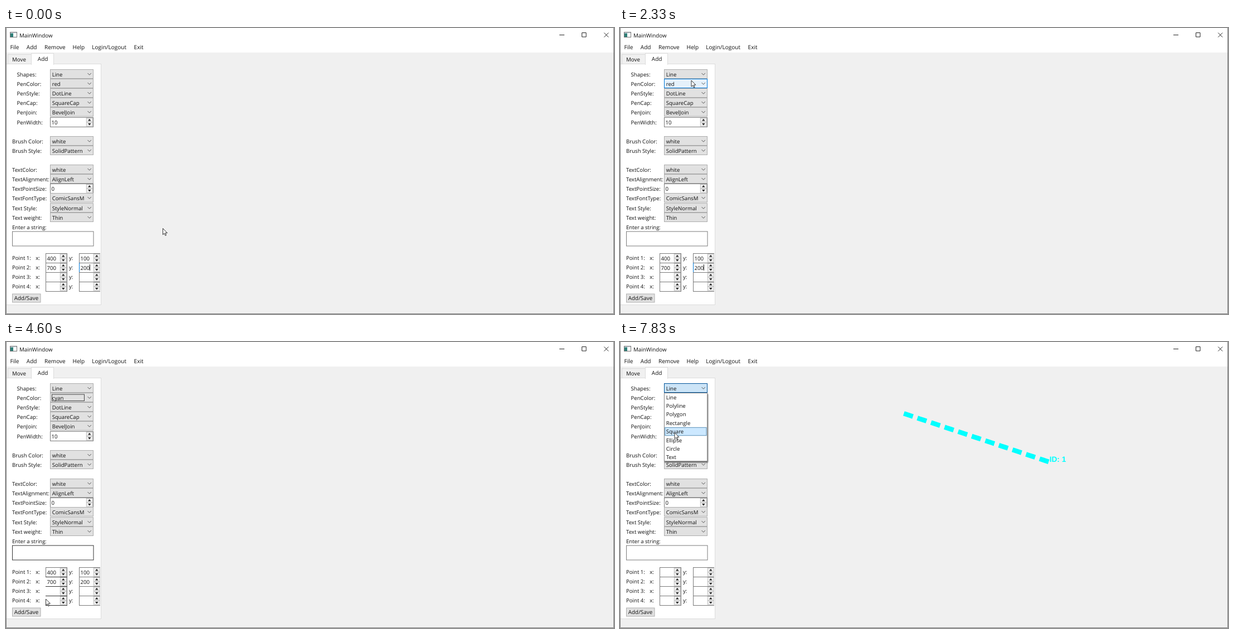
Animation, 1091 px wide and 513 px high, one loop 8000 ms. Source, as an HTML page:

```html
<!DOCTYPE html>
<html lang="en">
<head>
<meta charset="utf-8">
<title>MainWindow</title>
<style>
  html, body { margin: 0; width: 100%; height: 100%; overflow: hidden; background: #f0f0f0; }
  svg { display: block; }
  text { font: 9.65px "Open Sans", "Noto Sans", sans-serif; fill: #111; text-rendering: geometricPrecision; white-space: pre; }
  .popup { filter: drop-shadow(1.5px 2px .8px #0009); }
  .id { font: bold 16px "Liberation Sans", Arial, sans-serif; fill: #0ff; }
</style>
</head>
<body>
<svg id="stage" width="1091" height="513" viewBox="0 0 1091 513">
  <g id="chrome"></g><g id="form"></g><g id="drawing"></g><g id="overlay"></g>
  <path id="cursor" d="M0 0V11.2L2.6 8.8 4.4 12.8 6.1 12.1 4.4 8.1H7.9Z" fill="#fff" stroke="#111" stroke-width=".85"/>
</svg>
<script>
const LOOP = 8000, UNIT = 0.856, ROW = 20 * UNIT, ITEM = 18 * UNIT;
const GREY = '#adadad', EDGE = '#7a7a7a', BLUE = '#0078d7';
const $ = id => document.getElementById(id);

const text = (x, y, s, size = 9.65) => `<text x="${x}" y="${y}" style="font-size:${size}px">${s}</text>`;
const fill = (x, y, w, h, color) => `<rect x="${x}" y="${y}" width="${w}" height="${h}" fill="${color}"/>`;
const box = (x, y, w, h, color, edge, alpha = 1) =>
  `<rect x="${x + .5}" y="${y + .5}" width="${w - 1}" height="${h - 1}" fill="${color}" stroke="${edge}" opacity="${alpha}"/>`;
const stroke = (d, color, width = 1) => `<path d="${d}" fill="none" stroke="${color}" stroke-width="${width}"/>`;
const rowY = k => Math.floor(74.4 + ROW * k);

// row, label, value, kind
const FIELDS = [
  [0, 'Shapes:', 'Line'], [1, 'PenColor:', 'red'], [2, 'PenStyle:', 'DotLine'],
  [3, 'PenCap:', 'SquareCap'], [4, 'PenJoin:', 'BevelJoin'], [5, 'PenWidth:', '10', 'spin'],
  [7, 'Brush Color:', 'white'], [8, 'Brush Style:', 'SolidPattern'],
  [10, 'TextColor:', 'white'], [11, 'TextAlignment:', 'AlignLeft'], [12, 'TextPointSize:', '0', 'spin'],
  [13, 'TextFontType:', 'ComicSansM'], [14, 'Text Style:', 'StyleNormal'], [15, 'Text weight:', 'Thin'],
];
const MENUS = {
  0: ['Line', 'Polyline', 'Polygon', 'Rectangle', 'Square', 'Ellipse', 'Circle', 'Text'],
  1: ['white', 'black', 'red', 'green', 'blue', 'cyan', 'magenta', 'yellow', 'gray'],
};
const POINTS = [['400', '100'], ['700', '200'], ['', ''], ['', '']];

// time, cursor x, cursor y, changes that persist
const STEPS = [
  [0, 281.5, 359.5, { pen: 'red', filled: true, typing: true, caret: true, menu: -1, pick: -1, focus: -1, alpha: 1 }],
  [260, 281.5, 359.5, { caret: false }],
  [810, 281.5, 359.5, { caret: true }],
  [930, 235, 262],
  [1050, 156.5, 123],
  [1210, 148, 100],
  [1350, 141, 84, { caret: false }],
  [1470, 137, 80],
  [1590, 134.5, 79],
  [1850, 134, 82, { caret: true }],
  [2090, 131, 88],
  [2210, 128, 94],
  [2450, 127, 94, { caret: false, typing: false }],
  [2570, 127, 94, { menu: 1, pick: 2 }],
  [2710, 126, 137],
  [2830, 125, 162, { pick: 3 }],
  [3390, 124.5, 171],
  [3540, 124, 178, { pick: 4 }],
  [3670, 123, 187],
  [3820, 122, 194, { pick: 5 }],
  [4090, 122, 197, { menu: -1, pen: 'cyan', focus: 1 }],
  [4220, 115, 329],
  [4360, 98, 384, { dark: true }],
  [4480, 82, 436],
  [4600, 71.5, 461, { lit: true }],
  [4750, 54, 476, { dark: false, lit: false }],
  [4880, 45, 482],
  [5030, 45, 482, { drawn: true, filled: false, focus: -1, button: true }],
  [5180, 58, 477],
  [5300, 150, 430],
  [5425, 290, 350],
  [5550, 420, 285],
  [5670, 497, 249],
  [6080, 460, 243.5],
  [6230, 440, 232],
  [6355, 325, 168],
  [6480, 190, 102],
  [6600, 119, 80],
  [6740, 119, 80, { button: false, focus: 0, alpha: .5 }],
  [6870, 119, 80, { menu: 0, pick: 0 }],
  [7030, 119, 80, { alpha: .3 }],
  [7180, 119, 80, { alpha: .12 }],
  [7330, 108, 145, { pick: 3, focus: -1 }],
  [7460, 99, 170, { pick: 5 }],
  [7710, 98.5, 167],
  [7830, 98, 162.5, { pick: 4 }],
];
let state = {};
const STATES = STEPS.map(([time, x, y, change]) => (state = { ...state, time, x, y, ...change }));

const arrows = (x, y) => [0, 1].map(down => {
  const cy = y + (down ? 12.7 : 4.8), tip = down ? 1.7 : -1.7;
  return box(x - 6, y + 1 + down * 7.5, 12, 8, '#f0f0f0', '#c0c0c0')
    + `<path d="M${x - 2.8} ${cy - tip}h5.6L${x} ${cy + tip}z" fill="#222"/>`;
}).join('');

const spin = (x, y, w, value, edge = EDGE) =>
  box(x, y, w, 18, '#fff', edge) + arrows(x + w - 7.2, y) + text(x + 2.5, y + 12.8, value);

function combo(k, value, s) {
  const y = rowY(k), open = s.menu === k;
  const hover = s.menu < 0 && s.x >= 79 && s.x < 156 && s.y >= y && s.y < y + 17;
  const [color, edge] = open ? ['#cce4f7', '#005499'] : hover ? ['#e5f1fb', BLUE] : ['#e1e1e1', GREY];
  return box(79, y, 78, 17, color, edge)
    + (s.focus === k ? box(82, y + 2.5, 59, 12.5, 'none', '#444', s.alpha) : '')
    + text(82.7, y + 12.6, value)
    + stroke(`M146.5 ${y + 7}l3.2 3.2 3.2-3.2`, '#444', .9);
}

function pointRow(i, s) {
  const y = Math.floor(404 + ROW * i);
  const [px, py] = s.filled ? POINTS[i] : ['', ''];
  let out = text(11, y + 12.4, `Point ${i + 1}:`) + text(53.3, y + 12.4, 'x:') + text(113, y + 12.4, 'y:')
    + spin(71, y, 39, px) + spin(131, y, 39, py);
  if (s.lit && i) out += fill(71, y + 1, 1, 16, '#fff') + stroke(`M71 ${y + .5}h39M71 ${y + 17.5}h39`, '#333');
  if (i === 1 && s.typing) out += stroke(`M131.5 ${y}v17`, BLUE);
  if (i === 1 && s.caret) out += stroke(`M150.4 ${y + 3}v11`, '#111');
  return out;
}

function button(s) {
  const hover = s.x >= 12 && s.x < 62 && s.y >= 477 && s.y < 493;
  const [color, edge] = hover ? ['#e5f1fb', BLUE] : ['#e1e1e1', s.button ? '#777' : GREY];
  return box(11, 476.5, 51.5, 16, color, edge)
    + (s.button ? box(13, 478.5, 47.5, 12, 'none', '#666') : '')
    + text(14.8, 488.3, 'Add/Save', 9.9);
}

function form(s) {
  const fields = FIELDS.map(([k, label, value, kind]) => {
    const y = rowY(k);
    return text(k < 6 ? 19.5 : 11, y + 13.4, label)
      + (kind ? spin(79, y, 78, value) : combo(k, k === 1 ? s.pen : value, s));
  });
  return fields.join('') + text(11, 361, 'Enter a string:', 9.55) + fill(72, 352, 6, 11, '#fff')
    + box(11, 364.5, 146.5, 27, '#fff', s.dark ? '#333' : EDGE)
    + POINTS.map((_, i) => pointRow(i, s)).join('')
    + fill(169, 402, 1, 72, '#fff') + button(s);
}

function popup(s) {
  const items = MENUS[s.menu];
  if (!items) return '';
  const top = rowY(s.menu) + 17;
  const rows = items.map((name, i) => {
    const y = top + .2 + i * ITEM;
    return (i === s.pick ? box(80.3, y, 75.2, 15.4, '#cce8ff', '#5a91b8') : '') + text(82.7, y + 11.3, name);
  });
  return `<g class="popup">${box(79, top, 78, items.length * ITEM, '#fff', '#8a8a8a')}</g>` + rows.join('');
}

const drawing = `<g transform="translate(171 44) scale(${UNIT})">
  <path d="M400 100L700 200" stroke="#0ff" stroke-width="10" stroke-linecap="square" stroke-dasharray="10 20"/>
  <text class="id" x="700.5" y="199.5">ID: 1</text></g>`;

$('chrome').innerHTML = fill(0, 0, 1091, 513, '#f0f0f0') + fill(0, 0, 1091, 44, '#fff')
  + box(7, 7, 13, 10, '#fff', '#777') + fill(8, 8, 11, 1.5, '#ccd3dc') + fill(8, 9.5, 5, 6.5, '#2f7f78')
  + text(24, 16.6, 'MainWindow', 9.8)
  + stroke('M993 12.5h9M1033.5 8.5h7.5v7.5h-7.5zM1073.2 8.5l8 8m0-8l-8 8', '#222')
  + [['File', 7.5], ['Add', 36.8], ['Remove', 69], ['Help', 119.5], ['Login/Logout', 154.3], ['Exit', 229.6]]
    .map(([name, x]) => text(x, 38.2, name, 10.05)).join('')
  + box(3, 47, 43, 19, '#f0f0f0', '#dcdcdc') + box(0, 64, 171, 433, '#fff', '#dcdcdc')
  + box(45, 45, 41, 21, '#fff', '#dcdcdc') + fill(46, 64, 39, 3, '#fff')
  + text(11, 59.5, 'Move', 9.75) + text(56.8, 59, 'Add', 10)
  + stroke('M.5 0V512.5H1090.5V0', '#808080');

function render(s) {
  $('form').innerHTML = form(s);
  $('drawing').innerHTML = s.drawn ? drawing : '';
  $('overlay').innerHTML = popup(s);
  $('cursor').setAttribute('transform', `translate(${s.x} ${s.y})`);
}

const start = performance.now();
let shown;
function tick() {
  const t = (performance.now() - start) % LOOP;
  const s = STATES.findLast(step => step.time <= t);
  if (s !== shown) render(shown = s);
  requestAnimationFrame(tick);
}
tick();
</script>
</body>
</html>
```
